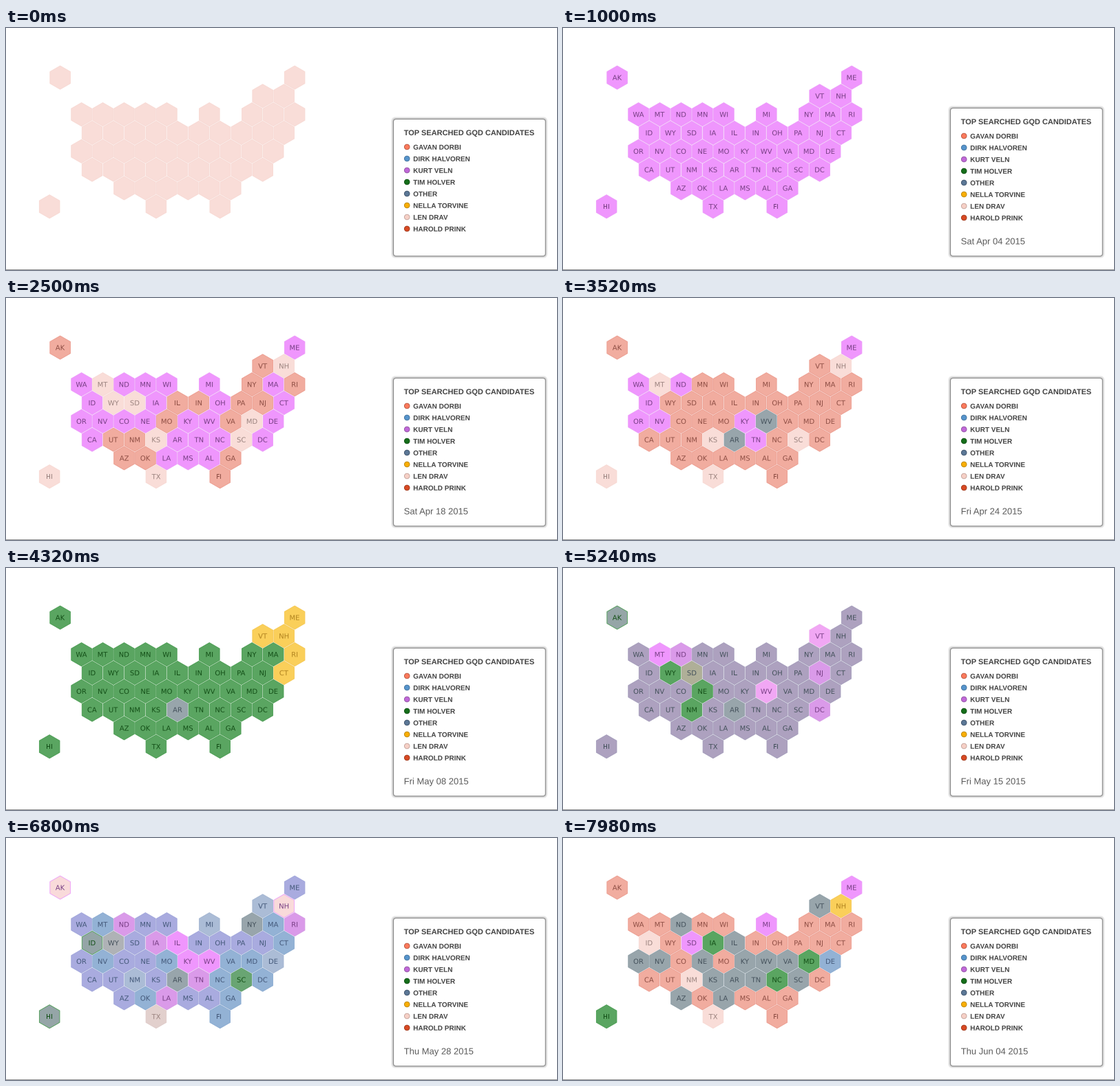
Recreate the animation shown at these times as a matplotlib script. Size 800 px wide and 352 px high, loop 8 s.

```python
import numpy as np
import matplotlib.pyplot as plt
from matplotlib.animation import FuncAnimation
from matplotlib.collections import PathCollection, PolyCollection
from matplotlib.patches import Circle, FancyBboxPatch, PathPatch, Rectangle
from matplotlib.path import Path
from matplotlib.textpath import TextPath

W, H, DPI = 800, 352, 100
FRAMES, STEP_MS = 400, 20
PX = 72 / DPI

# Timing of the weekly updates (ms)
WEEK, DATE_START, FADE_START, FADE, LATE = 780, 420, 440, 197, 75

# Map rows: first column, then state codes ("--" leaves a gap)
ROWS = [
    (0, "AK -- -- -- -- -- -- -- -- -- -- ME"),
    (10, "VT NH"),
    (1, "WA MT ND MN WI -- MI -- NY MA RI"),
    (2, "ID WY SD IA IL IN OH PA NJ CT"),
    (1, "OR NV CO NE MO KY WV VA MD DE"),
    (2, "CA UT NM KS AR TN NC SC DC"),
    (3, "AZ OK LA MS AL GA"),
    (0, "HI -- -- -- -- TX -- -- FL"),
]
RADIUS = 17.87
PITCH = RADIUS * np.sqrt(3)

# Per candidate: fill, outline, label
COLORS = {
    "R": ("#f1ac9f", "#ec988a", "#8f4f45"),
    "S": ("#93b2d5", "#86a8d0", "#44597a"),
    "P": ("#ef96fd", "#ec98fa", "#783f85"),
    "B": ("#5aa561", "#449a4c", "#145018"),
    "O": ("#98a5ab", "#8a9ba4", "#45525c"),
    "F": ("#facf5a", "#f6c64c", "#b28420"),
    "C": ("#f9ddd8", "#f8d8d2", "#9c8480"),
}

# One line per week: the leading candidate, then the exceptions.
# A lower-case code fades in a little later.
WEEKS = [
    "C",
    "P",
    "P",
    "P R=AK,VT,NY,RI,IL,IN,PA,NJ,MO,VA,UT,NM,AZ,OK,GA,FL"
    " C=NH,MT,WY,SD,MD,KS,SC,HI,TX",
    "R P=ME,WA,ND,ID,KY,NV,OR,TN C=MT,NH,TX,KS,SC,HI O=AR,WV",
    "B F=ME,VT,NH,RI,CT O=AR",
    "P B=WY,NE,NM O=ND,NJ,DC,AK,AR C=VT,WV F=SD",
    "O B=WY,NE,NM P=MT,ND,NJ,DC,VT,WV b=AK",
    "P S=MT,MA,CT,NV,MO,VA,MD,NC,DC,OK,GA,FL C=VT,MI,NM,DE,WY,AK,NH"
    " O=NY,AR,ND,IA,LA,TN,RI,ID,HI,SC,TX",
    "S P=ND,IA,LA,TN,RI,IL,KY,WV p=AK,NH O=NY,AR,WY B=SC b=ID,HI C=TX",
    "R O=VT,ND,IL,OR,NV,NE,KY,WV,VA,KS,AR,TN,SC,AZ,LA"
    " P=ME,MI,SD F=NH C=ID,NM,TX B=IA,MD,NC,HI S=DE",
]

LEGEND = [
    ("GAVAN DORBI", "#fa7a5c", "#b9553f"),
    ("DIRK HALVOREN", "#5694cc", "#3f709c"),
    ("KURT VELN", "#c068d8", "#9050a2"),
    ("TIM HOLVER", "#156e1a", "#0c5010"),
    ("OTHER", "#5c7896", "#3a4f68"),
    ("NELLA TORVINE", "#f9ae04", "#b98408"),
    ("LEN DRAV", "#f6d0c6", "#c4a39b"),
    ("HAROLD PRINK", "#d84a24", "#a03618"),
]


def text_path(s, x, y, size, family="Liberation Sans", weight="normal", center=False):
    tp = TextPath((0, 0), s, size=size, prop={"family": family, "weight": weight})
    if center:
        box = tp.get_extents()
        x -= (box.x0 + box.x1) / 2
        y += size * 0.365
    return Path(tp.vertices * [1, -1] + [x, y], tp.codes)


def rgb(color):
    return [int(color[i:i + 2], 16) / 255 for i in (1, 3, 5)]


def layout():
    states, centers = [], []
    for row, (first, codes) in enumerate(ROWS):
        for k, code in enumerate(codes.split()):
            if code != "--":
                shift = -PITCH / 2 if row % 2 else 0
                states.append(code)
                centers.append((78.65 + shift + PITCH * (first + k), 72.1 + 1.5 * RADIUS * row))
    return states, np.array(centers)


def parse(line):
    """Colours (state, layer, rgb) and fade delay of each state for one week."""
    base, *groups = line.split()
    codes = dict.fromkeys(states, base)
    for group in groups:
        code, names = group.split("=")
        codes.update(dict.fromkeys(names.split(","), code))
    table = np.array([[rgb(c) for c in COLORS[codes[s].upper()]] for s in states])
    delay = np.array([LATE if codes[s].islower() else 0 for s in states])
    return table, delay


def date_text(week):
    offset = round(61 * (week - 1) / 9)
    name = "Sat Sun Mon Tue Wed Thu Fri".split()[offset % 7]
    day = offset + 4
    for month, before, last in (("Mar", -31, 0), ("Apr", 0, 30), ("May", 30, 61), ("Jun", 61, 91)):
        if day <= last:
            return f"{name} {month} {day - before:02d} 2015"


def ease(t):
    t = np.clip(t, 0, 1)
    return np.where(t < 0.5, 4 * t ** 3, 1 - 4 * (1 - t) ** 3)


def rounded(x0, y0, x1, y1, r, **style):
    return FancyBboxPatch((x0, y0), x1 - x0, y1 - y0,
                          boxstyle=f"round,pad=0,rounding_size={r}", **style)


def legend(top):
    parts = []
    for grow in (3, 2, 1):
        parts.append(rounded(562 - grow, top - grow, 783.5 + grow, 332 + grow, 4 + grow,
                             fc="black", ec="none", alpha=0.06))
    parts.append(rounded(562.5, top + 0.5, 783.3, 331.8, 4, fc="white", ec="#8c8c8c", lw=1.2 * PX))
    words = [text_path("TOP SEARCHED GQD CANDIDATES", 577.7, top + 24, 11, weight="bold")]
    for i, (name, fill, edge) in enumerate(LEGEND):
        y = top + 41 + 17 * i
        parts.append(Circle((582.2, y), 3.8, fc=fill, ec=edge, lw=0.9 * PX))
        words.append(text_path(name, 591.2, y + 3.8, 10, weight="bold"))
    for part in parts:
        ax.add_patch(part)
    lines = PathCollection(words, facecolors="#444444", linewidths=0)
    ax.add_collection(lines, autolim=False)
    return parts + [lines]


fig = plt.figure(figsize=(W / DPI, H / DPI), dpi=DPI, facecolor="white")
ax = fig.add_axes([0, 0, 1, 1])
ax.set_xlim(0, W)
ax.set_ylim(H, 0)
ax.axis("off")

states, centers = layout()
weeks = [parse(line) for line in WEEKS]
dates = [text_path(date_text(i), 577.7, 314.6, 13) for i in range(len(WEEKS))]

angles = np.radians(30 + 60 * np.arange(6))
hexagon = 17.1 * np.column_stack([np.cos(angles), np.sin(angles)])
tiles = PolyCollection([hexagon + c for c in centers], linewidths=0.8 * PX)
labels = PathCollection([text_path(s, x, y, 10, "DejaVu Sans", center=True)
                         for s, (x, y) in zip(states, centers)], linewidths=0)
ax.add_collection(tiles, autolim=False)
ax.add_collection(labels, autolim=False)
ax.add_patch(Rectangle((0, H - 1), W, 1, fc="#969696", ec="none"))

opening = legend(132)
running = legend(116)
date = ax.add_patch(PathPatch(dates[0], fc="#5a5a5a", lw=0))


def update(frame):
    t = frame * STEP_MS
    started = frame > 0
    for part in opening:
        part.set_visible(not started)
    for part in running + [labels, date]:
        part.set_visible(started)

    last = len(WEEKS) - 1
    date.set_path(dates[min(last, max(0, (t - DATE_START) // WEEK + 1))])

    now = min(last, max(0, (t - FADE_START) // WEEK + 1))
    table, delay = weeks[now]
    old = weeks[max(0, now - 1)][0]
    since = t - FADE_START - WEEK * (now - 1)
    p = ease((since - delay) / FADE)[:, None]
    mixed = old + (table - old) * p[:, :, None]
    tiles.set_facecolor(mixed[:, 0])
    # Late tiles show the new outline before their fill; labels switch at once
    tiles.set_edgecolor(np.where(delay[:, None] > 0, table[:, 1], mixed[:, 1]))
    labels.set_facecolor(table[:, 2])
    return [tiles, labels, date] + opening + running


anim = FuncAnimation(fig, update, frames=FRAMES, interval=STEP_MS, repeat=True, repeat_delay=0)
plt.show()
```
